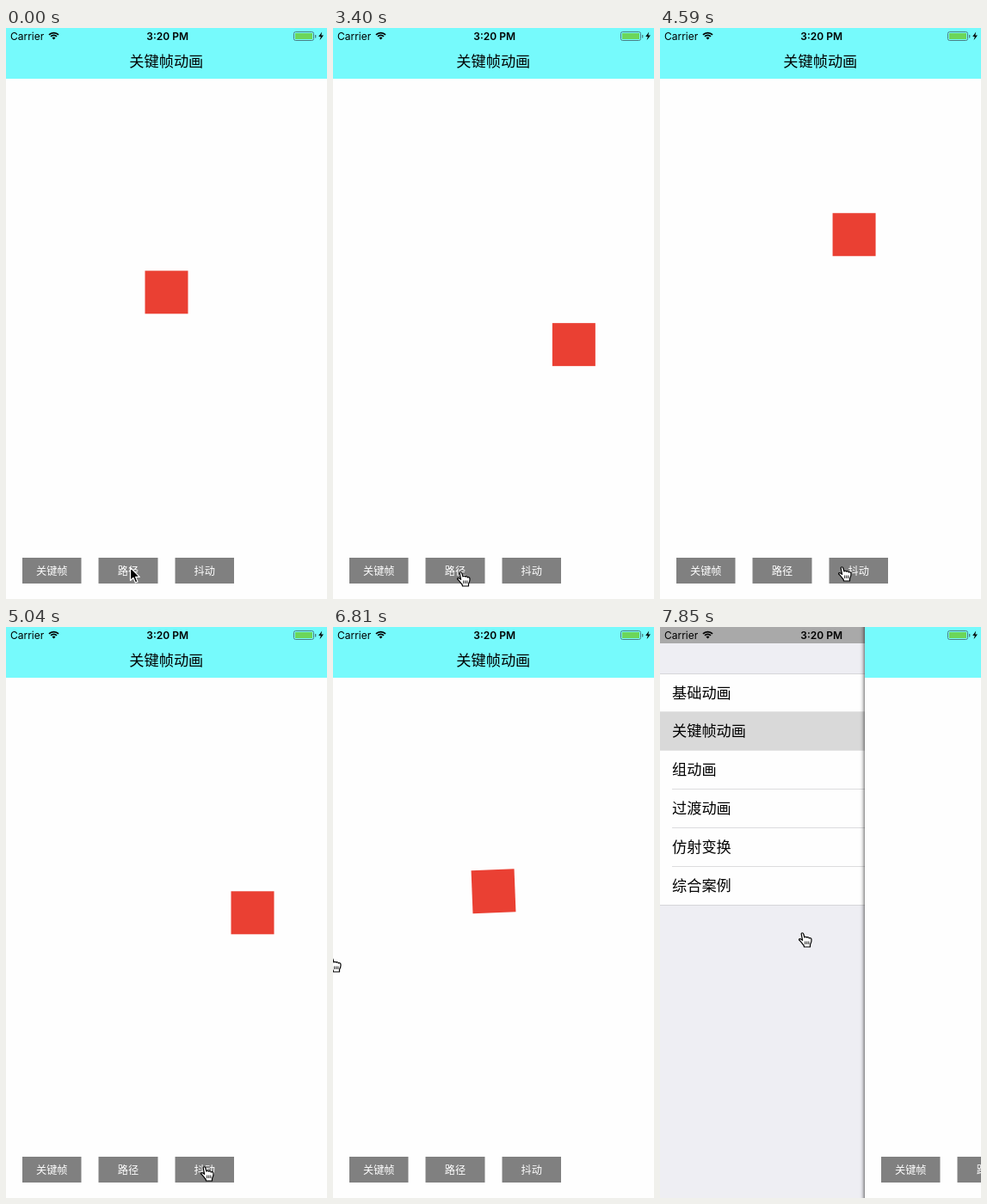
Recreate the animation shown at these times as an HTML page with a canvas. Size 373 px wide and 664 px high, loop 8 s.

```html
<!DOCTYPE html>
<html lang="zh">
<head>
<meta charset="utf-8">
<style>
html, body { margin: 0; width: 100%; height: 100%; overflow: hidden; background: #fefefe; }
canvas { display: block; width: 373px; height: 664px; }
</style>
</head>
<body>
<canvas id="stage"></canvas>
<script>
const W = 373, H = 664, LOOP = 8000, STEP = LOOP / 54;
const CJK = '"Noto Sans CJK SC", "Noto Sans CJK", sans-serif';
const LATIN = 'Inter, Roboto, sans-serif';
const canvas = document.getElementById('stage');
const ctx = canvas.getContext('2d');
const dpr = window.devicePixelRatio || 1;
canvas.width = W * dpr;
canvas.height = H * dpr;

// [step, x, y] of the pointer; it is an arrow before step 15
const POINTER = [
  [0, 144, 627], [3, 144, 627], [4, 138, 628], [5, 138, 628], [6, 140, 629], [14, 140, 629],
  [15, 136, 631], [19, 136, 631], [21, 144, 632], [23, 144, 632], [28, 187, 624],
  [34, 226, 627], [37, 226, 627], [46, -6, 384], [51, 161, 355], [53, 161, 355]
];
const PANEL = [[0, 0], [46, 0], [51, 167], [52, 215], [53, 238]];

const ARROW = new Path2D('M0.5 0.5V15.5L4 12.3L6.4 18L9 16.9L6.6 11.3H11.3Z');
const HAND = new Path2D('M3.2 2C3 .3 5.4 .3 5.8 2L7 6C7.4 4.9 9.4 5 9.7 6.2C10.3 5.4 12 5.6 12.3 7' +
  'C13 6.3 15 6.6 15 8.5C15.3 11 14.2 13 13.5 14.5V17H6.5L6 15C4.5 13.5 3 11 1 9.3C-.2 8 1.5 7 2.8 8L4.6 9.3Z');
const CREASES = new Path2D('M7.7 10.5V14M9.8 10.5V14M11.9 10.5V14');
const BOLT = new Path2D('M367.2 4.6L363.2 10H365.8L364.6 14.2L369 8.4H366.3Z');

function track(keys, k) {
  let i = 1;
  while (i < keys.length - 1 && keys[i][0] < k) i++;
  const a = keys[i - 1], b = keys[i];
  const u = Math.min(1, (k - a[0]) / (b[0] - a[0]));
  return a.slice(1).map((v, n) => v + (b[n + 1] - v) * u);
}

function box(color, x, y, w, h) {
  ctx.fillStyle = color;
  ctx.fillRect(x, y, w, h);
}

function text(str, x, y, font, color, align = 'left') {
  ctx.font = font;
  ctx.fillStyle = color;
  ctx.textAlign = align;
  ctx.fillText(str, x, y);
}

function drawMenu() {
  box('#eeeef3', 0, 0, W, H);
  box('#a9a9a9', 0, 0, W, 19);
  const top = 54, row = 44.85;
  box('#fefefe', 0, top, W, row * 6);
  box('#d9d9d9', 0, top + row - 0.5, W, row + 0.5);
  ['基础动画', '关键帧动画', '组动画', '过渡动画', '仿射变换', '综合案例'].forEach((label, i) => {
    text(label, 14, 82.6 + row * i, '17.2px ' + CJK, '#000');
    if (i > 1 && i < 5) box('#dcdcde', 14, Math.floor(top + row * (i + 1)), W, 1);
  });
  box('#d6d6d9', 0, top, W, 1);
  box('#d6d6d9', 0, 323, W, 1);
}

function drawSquare(k) {
  let x = 186.5, y = 307.3, turn = 0;
  if (k >= 23 && k < 36) {
    const a = Math.min(360, 21 + 34 * (k - 23)) * Math.PI / 180;
    x += 100 * Math.cos(a);
    y = 332.3 + 100 * Math.sin(a);
  } else if (k >= 38) {
    const p = k * STEP / 250 + 0.353;
    turn = 4 * (4 * Math.abs(p % 1 - 0.5) - 1);
  }
  ctx.save();
  ctx.translate(x, y);
  ctx.rotate(turn * Math.PI / 180);
  box('#ea4033', -25, -25, 50, 50);
  ctx.restore();
}

function drawPanel(k, dx) {
  ctx.save();
  ctx.translate(dx, 0);
  ctx.save();
  if (dx > 0) {
    ctx.shadowColor = 'rgba(0,0,0,.9)';
    ctx.shadowBlur = 5 * dpr;
  }
  box('#fefefe', 0, -10, W, H + 20);
  ctx.restore();
  box('#76fafc', 0, 0, W, 59);
  text('关键帧动画', 186.3, 45.4, '17.2px ' + CJK, '#000', 'center');
  [['关键帧', 19, 68.5], ['路径', 107.5, 69], ['抖动', 196.5, 68.5]].forEach(([label, x, w]) => {
    box('#808080', x, 616, w, 30);
    text(label, x + w / 2, 635.7, '12.2px ' + CJK, '#fff', 'center');
  });
  drawSquare(k);
  ctx.restore();
}

function drawStatus() {
  text('Carrier', 5, 13.6, '12px ' + LATIN, '#000');
  text('3:20 PM', 187.7, 13.6, '600 12px ' + LATIN, '#000', 'center');

  ctx.strokeStyle = '#000';
  ctx.lineWidth = 1.8;
  for (const r of [7.8, 4.9]) {
    ctx.beginPath();
    ctx.arc(55.5, 13.4, r, -Math.PI * 0.75, -Math.PI * 0.25);
    ctx.stroke();
  }
  ctx.fillStyle = '#000';
  ctx.beginPath();
  ctx.moveTo(55.5, 13.6);
  ctx.arc(55.5, 13.4, 2.8, -Math.PI * 0.75, -Math.PI * 0.25);
  ctx.fill();

  ctx.strokeStyle = '#4a7f80';
  ctx.lineWidth = 1;
  ctx.beginPath();
  ctx.roundRect(334.5, 4.5, 23, 10, 2);
  ctx.stroke();
  box('#6cd65a', 336, 6, 20, 7);
  box('#4a7f80', 359, 8, 1.3, 3.5);
  ctx.fillStyle = '#000';
  ctx.fill(BOLT);
}

function drawPointer(k) {
  const [x, y] = track(POINTER, k);
  const arrow = k < 15;
  const shape = arrow ? ARROW : HAND;
  ctx.save();
  ctx.translate(Math.round(x), Math.round(y));
  ctx.lineJoin = 'round';
  ctx.lineWidth = 1.2;
  ctx.fillStyle = arrow ? '#000' : '#fff';
  ctx.strokeStyle = arrow ? '#fff' : '#000';
  ctx.fill(shape);
  ctx.stroke(shape);
  if (!arrow) {
    ctx.lineWidth = 0.9;
    ctx.stroke(CREASES);
  }
  ctx.restore();
}

function draw(now) {
  const k = Math.floor((now % LOOP + 12) / STEP) % 54;
  const [dx] = track(PANEL, k);
  ctx.setTransform(dpr, 0, 0, dpr, 0, 0);
  if (dx > 0) drawMenu();
  drawPanel(k, Math.round(dx));
  drawStatus();
  drawPointer(k);
}

let start;
function frame(now) {
  if (start === undefined) start = now;
  draw(now - start);
  requestAnimationFrame(frame);
}
draw(0);
requestAnimationFrame(frame);
</script>
</body>
</html>
```
